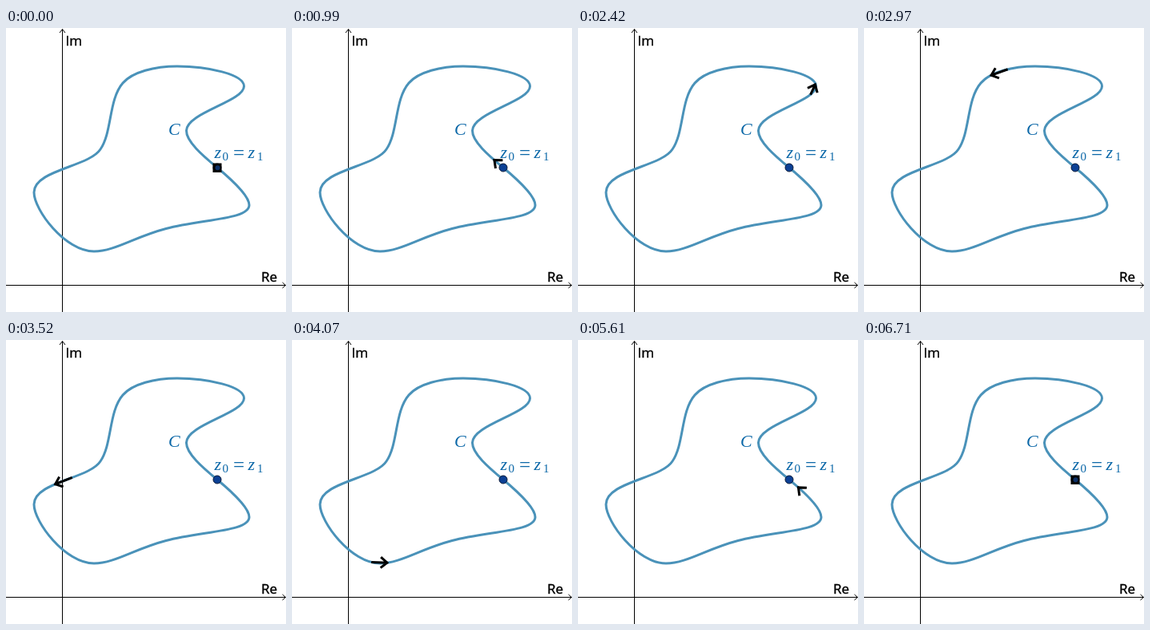
Recreate the animation shown at these times as an HTML page. Size 350x356 px, loop 6820 ms.

```html
<!DOCTYPE html>
<html lang="en">
<head>
<meta charset="utf-8">
<title>Closed contour</title>
<style>
  html, body { margin: 0; width: 100%; height: 100%; overflow: hidden; background: #fff; }
  svg { display: block; width: 350px; height: 356px; }
  .axis { fill: none; stroke: #000; stroke-width: 1; }
  .label { font: 17px "Open Sans", "Noto Sans", sans-serif; stroke: #000; stroke-width: .4; }
  .math { font: italic 22px "Liberation Serif", serif; fill: #0c68a8; }
  .sub { font-size: 15px; font-style: normal; }
  .sign { font-size: 25px; font-style: normal; }
</style>
</head>
<body>
<svg viewBox="0 0 350 356">
  <rect width="350" height="356" fill="#fff"/>
  <path class="axis" d="M70.5 356V1.5M67 6L70.5 1.5L74 6M0 322.5H349.5M345.5 319L349.5 322.5L345.5 326"/>
  <text class="label" x="74.5" y="22">Im</text>
  <text class="label" x="319" y="318">Re</text>
  <path id="curve" fill="none" stroke="#4a92b9" stroke-width="3" d="M264 175
    C246 160 225 142 225.5 128.5 C226 106 297.5 92 297.5 73
    C297.5 58 252 48 214 48 C186 48 158 55 146 69
    C128 90 133 130 118 152 C104 174 35 178 35 206
    C35 228 74 280 110 280 C136 280 160 262 200 251.5
    C246 239.5 304 240 304 222 C304 211 282 190 264 175Z"/>
  <text class="math" x="203" y="134">C</text>
  <text class="math" y="163"><tspan x="260.5">z</tspan><tspan class="sub" x="270.5" y="166">0</tspan><tspan
    class="sign" x="284" y="165">=</tspan><tspan x="302.5" y="163">z</tspan><tspan class="sub" x="314" y="166">1</tspan></text>
  <circle cx="264" cy="175" r="5" fill="#0c4094" stroke="#0a1a38"/>
  <path id="arrow" fill="none" stroke="#000" stroke-width="3"/>
  <g id="rest">
    <rect x="258.5" y="169.5" width="11" height="11.5"/>
    <circle cx="264.5" cy="175.3" r="3" fill="#0b2f66"/>
  </g>
</svg>
<script>
const STEP = 110, COUNT = 62, LAST = COUNT - 1;
const LAG = 0.7, BARB = 10.5, SPREAD = 0.7;
const curve = document.getElementById("curve");
const arrow = document.getElementById("arrow");
const rest = document.getElementById("rest");
const total = curve.getTotalLength();

// Sigmoid ease, normalised to run from 0 to 1
const sigmoid = x => 1 / (1 + Math.exp(-x));
const edge = sigmoid(-5);
const ease = step => (sigmoid(10 * (step / LAST - 0.5)) - edge) / (1 - 2 * edge);

function lengthNear(x, y) {
  let best = Infinity, found = 0;
  for (let s = 0; s < total; s += 0.5) {
    const p = curve.getPointAtLength(s);
    const d = Math.hypot(p.x - x, p.y - y);
    if (d < best) { best = d; found = s; }
  }
  return found;
}

// Where the tip passes: step, x, y
const passes = [[16, 225.8, 133], [27, 158, 59.5], [37, 120, 279], [45, 304.3, 225], [51, 274.5, 184.5]];
const knots = [
  [0, 0],
  ...passes.map(([step, x, y]) => [ease(step), lengthNear(x, y)]),
  [1, total]
];
const slopes = knots.map((_, i) => {
  const a = knots[Math.max(i - 1, 0)], b = knots[Math.min(i + 1, knots.length - 1)];
  return (b[1] - a[1]) / (b[0] - a[0]);
});

// Cubic Hermite from eased time to distance along the curve
function distance(step) {
  const e = Math.min(1, Math.max(0, ease(step)));
  let i = 0;
  while (i < knots.length - 2 && e > knots[i + 1][0]) i++;
  const [x0, y0] = knots[i], [x1, y1] = knots[i + 1];
  const h = x1 - x0, t = (e - x0) / h, q = 1 - t;
  return y0 * (1 + 2 * t) * q * q + slopes[i] * h * t * q * q
    + y1 * t * t * (3 - 2 * t) - slopes[i + 1] * h * t * t * q;
}

function render(step) {
  const still = step === 0 || step === LAST;
  rest.style.display = still ? "" : "none";
  arrow.style.display = still ? "none" : "";
  if (still) return;
  const tip = curve.getPointAtLength(distance(step));
  const tail = curve.getPointAtLength(distance(step - LAG));
  const angle = Math.atan2(tip.y - tail.y, tip.x - tail.x);
  const x = tip.x - Math.cos(angle), y = tip.y - Math.sin(angle);
  const barb = turn => `${x - BARB * Math.cos(angle + turn)} ${y - BARB * Math.sin(angle + turn)}`;
  arrow.setAttribute("d",
    `M${tail.x} ${tail.y}L${tip.x} ${tip.y}M${barb(SPREAD)}L${x} ${y}L${barb(-SPREAD)}`);
}

function tick() {
  render(Math.floor(performance.now() / STEP) % COUNT);
  requestAnimationFrame(tick);
}
tick();
</script>
</body>
</html>
```
